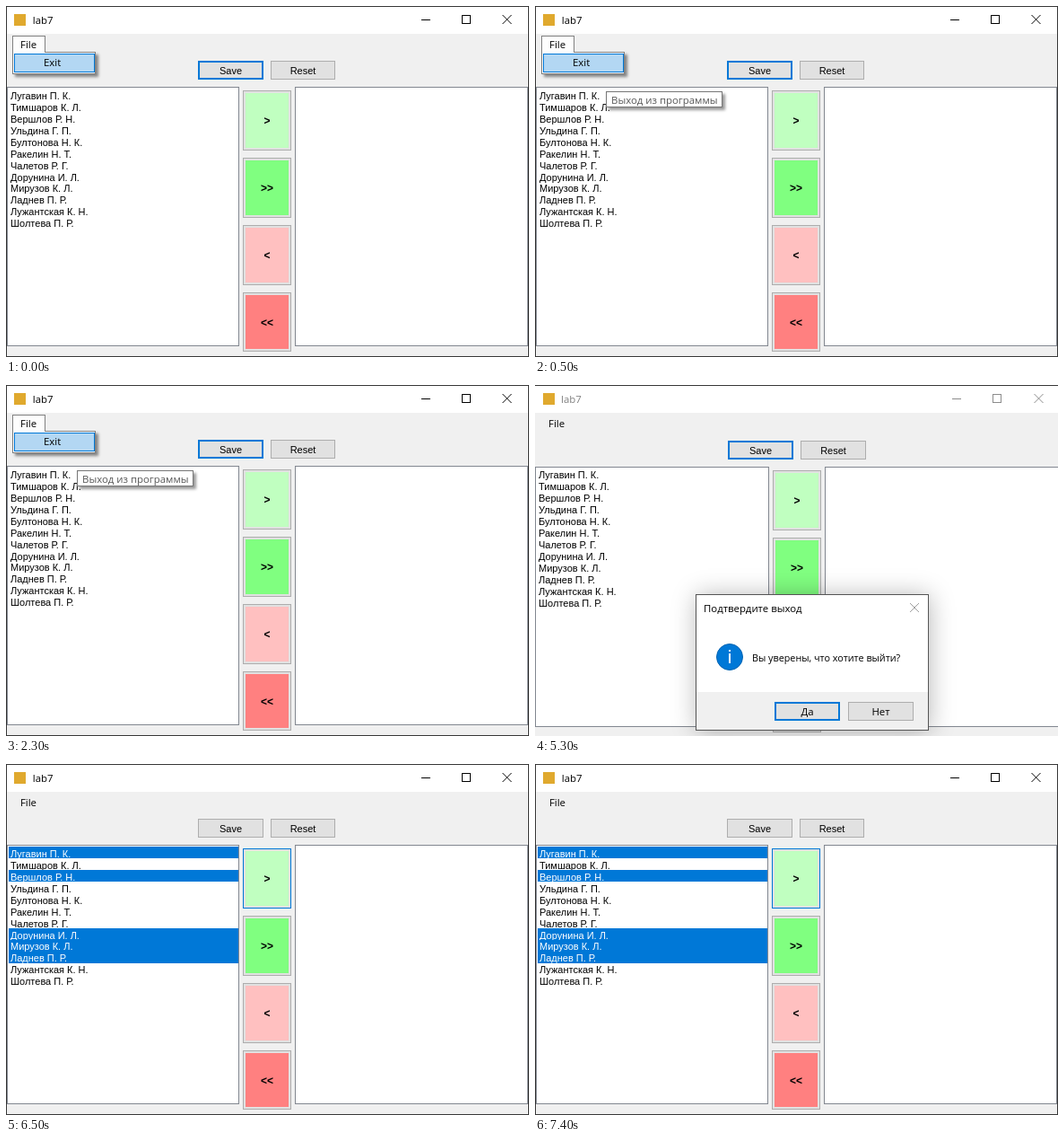
An HTML page with a canvas for the animation above (8 s loop, 583x391 px).

```html
<!DOCTYPE html>
<html lang="ru">
<head>
<meta charset="utf-8">
<title>lab7</title>
<style>
html, body { margin: 0; width: 100%; height: 100%; overflow: hidden; background: #f0f0f0; }
canvas { display: block; }
</style>
</head>
<body>
<canvas id="stage" width="583" height="391"></canvas>
<script>
const ctx = document.getElementById('stage').getContext('2d');
const W = 583, H = 391, LOOP = 8000;
const BLUE = '#0078d7', FACE = '#f0f0f0', EDGE = '#383838';
const FORM = '11px "Liberation Sans", sans-serif';
const BOLD = 'bold 12px "Liberation Sans", sans-serif';
const SYSTEM = '11.4px "Open Sans", sans-serif';
const MESSAGE = '10.8px "Open Sans", sans-serif';

const people = [
  'Лугавин П. К.', 'Тимшаров К. Л.', 'Вершлов Р. Н.', 'Ульдина Г. П.',
  'Бултонова Н. К.', 'Ракелин Н. Т.', 'Чалетов Р. Г.', 'Дорунина И. Л.',
  'Мирузов К. Л.', 'Ладнев П. Р.', 'Лужантская К. Н.', 'Шолтева П. Р.'
];
const chosen = [0, 2, 7, 8, 9];
const arrows = [['>', '#c0ffc0'], ['>>', '#80ff80'], ['<', '#ffc0c0'], ['<<', '#ff8080']];

function fill(x, y, w, h, color) {
  ctx.fillStyle = color;
  ctx.fillRect(x, y, w, h);
}

function box(x, y, w, h, color, border, line = 1) {
  fill(x, y, w, h, border);
  fill(x + line, y + line, w - 2 * line, h - 2 * line, color);
}

function text(s, x, y, font, color = '#000', align = 'left') {
  ctx.font = font;
  ctx.textAlign = align;
  ctx.fillStyle = color;
  ctx.fillText(s, x, Math.round(y));
}

function button(label, x, y, w, h, font, focused) {
  box(x, y, w, h, '#e1e1e1', focused ? BLUE : '#adadad', focused ? 2 : 1);
  text(label, x + w / 2, y + h / 2 + 4, font, '#000', 'center');
}

function cross(x, y, size, color) {
  ctx.strokeStyle = color;
  ctx.lineWidth = 1;
  ctx.beginPath();
  ctx.moveTo(x, y);
  ctx.lineTo(x + size, y + size);
  ctx.moveTo(x + size, y);
  ctx.lineTo(x, y + size);
  ctx.stroke();
}

function shadowed(blur, offset, alpha, draw) {
  ctx.save();
  ctx.shadowColor = `rgba(0,0,0,${alpha})`;
  ctx.shadowBlur = blur;
  ctx.shadowOffsetX = ctx.shadowOffsetY = offset;
  draw();
  ctx.restore();
}

function drawWindow(framed, selecting) {
  const mapX = x => framed ? 1 + x * 0.9945 : x;
  const mapY = y => framed ? 0.2 + y * 0.9966 : y;
  const X = x => Math.floor(mapX(x));
  const Y = y => Math.floor(mapY(y));
  const ink = framed ? '#000' : '#8c8c8c';

  fill(0, 0, W, H, FACE);
  fill(0, 0, W, 31, '#fff');
  fill(X(9), 9, 13, 13, '#e0a92e');
  text('lab7', mapX(29), 20, SYSTEM, framed ? '#000' : '#808080');

  fill(X(465), 15, 10, 1, ink);
  ctx.strokeStyle = ink;
  ctx.lineWidth = 1;
  ctx.strokeRect(X(510) + 0.5, 10.5, 9, 9);
  cross(X(557) - 0.5, 10, 10, ink);
  text('File', mapX(15), 47, SYSTEM);

  const pushY = Y(62), pushH = Y(83) - pushY;
  button('Save', X(215), pushY, X(288) - X(215), pushH, FORM, !selecting);
  button('Reset', X(296), pushY, X(369) - X(296), pushH, FORM, false);

  const top = Y(91), listH = Y(381) - top;
  box(X(0), top, X(261) - X(0), listH, '#fff', '#828790');
  box(X(323), top, X(585) - X(323), listH, '#fff', '#828790');

  people.forEach((name, i) => {
    const lit = selecting && chosen.includes(i);
    const y = Y(93 + 13 * i);
    if (lit) fill(3, y, 256, Y(106 + 13 * i) - y, BLUE);
    text(name, mapX(4), mapY(104 + 13 * i), FORM, lit ? '#fff' : '#000');
  });

  arrows.forEach(([label, color], i) => {
    const x = X(265), y = Y(95 + 75 * i);
    const w = X(319) - x, h = Y(162 + 75 * i) - y;
    box(x, y, w, h, '#e1e1e1', selecting && i === 0 ? BLUE : '#adadad');
    fill(x + 3, y + 3, w - 6, h - 6, color);
    text(label, x + w / 2, y + h / 2 + 4.5, BOLD, '#000', 'center');
  });

  fill(0, 0, W, 1, EDGE);
  if (framed) {
    fill(0, 0, 1, H, EDGE);
    fill(W - 1, 0, 1, H, EDGE);
    fill(0, H - 1, W, 1, EDGE);
  }
}

function drawMenu() {
  shadowed(3, 3, 0.45, () => fill(7, 51, 93, 25, '#808080'));
  box(7, 51, 93, 25, '#fdfdfd', '#808080');
  box(7, 33, 37, 19, '#fdfdfd', '#808080');
  fill(8, 50, 35, 2, '#fdfdfd');
  text('File', 16, 47, SYSTEM);
  box(9, 53, 90, 21, '#b3d7f3', BLUE);
  text('Exit', 42, 67, SYSTEM);
}

function drawTooltip() {
  shadowed(3, 3, 0.4, () => fill(79, 95, 130, 18, '#767676'));
  box(79, 95, 130, 18, '#fff', '#767676');
  text('Выход из программы', 85, 109, SYSTEM, '#575757');
}

function drawDialog() {
  shadowed(26, 1, 0.28, () => fill(179, 233, 260, 152, '#555'));
  box(179, 233, 260, 152, '#fff', '#555');
  fill(180, 342, 258, 42, FACE);
  text('Подтвердите выход', 188, 253, SYSTEM);
  cross(418, 243, 10, '#a0a0a0');

  ctx.fillStyle = BLUE;
  ctx.strokeStyle = '#0063b1';
  ctx.lineWidth = 1;
  ctx.beginPath();
  ctx.arc(217, 303, 14.5, 0, Math.PI * 2);
  ctx.fill();
  ctx.stroke();
  fill(216, 295, 2, 2, '#fff');
  fill(216, 299, 2, 11, '#fff');

  text('Вы уверены, что хотите выйти?', 242, 308, MESSAGE);
  button('Да', 267, 353, 73, 21, SYSTEM, true);
  button('Нет', 349, 353, 73, 21, SYSTEM, false);
}

function render(now) {
  const t = now % LOOP;
  const asking = t >= 3500 && t < 6500;
  drawWindow(!asking, t >= 6500);
  if (t < 3500) drawMenu();
  if (t >= 500 && t < 3500) drawTooltip();
  if (asking) drawDialog();
}

const start = performance.now();
function tick() {
  render(performance.now() - start);
  requestAnimationFrame(tick);
}
tick();
</script>
</body>
</html>
```
